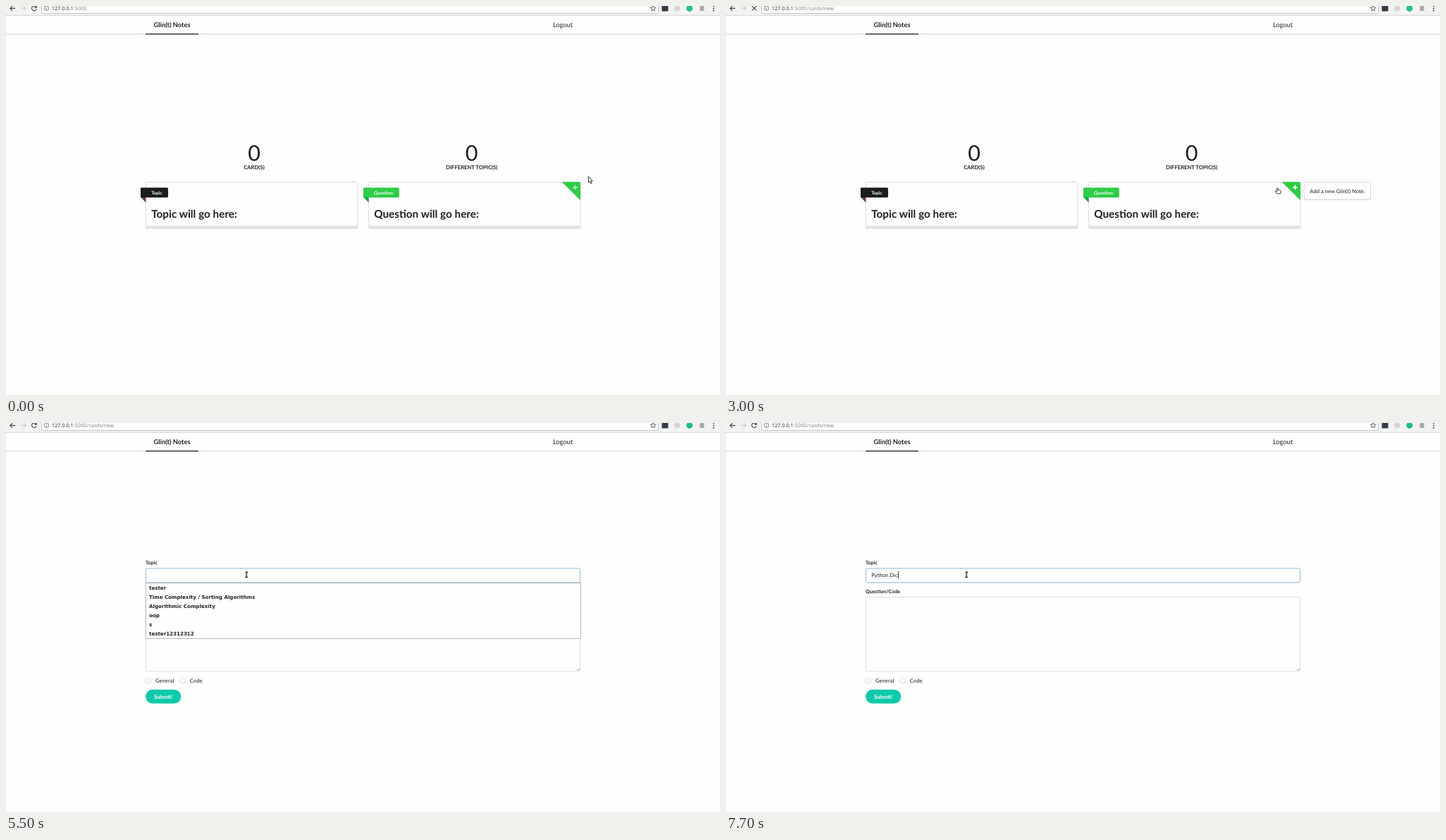
Recreate the animation shown at these times as an HTML page. Size 1013 by 553 pixels, loop 8000 ms.

```html
<!DOCTYPE html>
<html lang="en">
<head>
<meta charset="utf-8">
<title>Study cards</title>
<style>
html, body { margin: 0; width: 100%; height: 100%; overflow: hidden; background: #fefefe; }
svg { position: absolute; left: 0; top: 0; }
text, #topic { font-family: Lato, sans-serif; text-rendering: geometricPrecision; white-space: pre; }
text { fill: #1f2021; }
.b { font-weight: 700; }
.mid { text-anchor: middle; }
.ui { font-family: "Noto Sans", sans-serif; }
.list text { font: 700 7.12px "DejaVu Sans", sans-serif; fill: #222; }
.line { fill: none; stroke: #dcdddd; }
.icon { fill: none; stroke: #444; stroke-width: 1.1; }

.home, .form, .path, .reload, .stop, .tip, .status, .url, .plus, .ring, .all, .match,
.cursor, .arrow, .hand, .beam, #topic, #topic::before { animation: 8s step-end infinite; }

.home { animation-name: home; }
.form { animation-name: form; }
@keyframes home { 0% { opacity: 1 } 40%, 100% { opacity: 0 } }
@keyframes form { 0% { opacity: 0 } 40%, 100% { opacity: 1 } }

.path { animation-name: path; }
.stop { animation-name: stop; }
.reload { animation-name: reload; }
@keyframes path { 0% { opacity: 0 } 31.25%, 100% { opacity: 1 } }
@keyframes stop { 0% { opacity: 0 } 31.25% { opacity: 1 } 40%, 100% { opacity: 0 } }
@keyframes reload { 0% { opacity: 1 } 31.25% { opacity: 0 } 40%, 100% { opacity: 1 } }

.plus { animation-name: plus; }
@keyframes plus { 0% { opacity: .65 } 31.25%, 100% { opacity: 1 } }

.tip { animation-name: tip; transform-origin: 818px 263px; }
@keyframes tip {
  0% { opacity: 0; transform: scale(.9) }
  7.5% { opacity: .6; transform: scale(.96) }
  10%, 100% { opacity: 1; transform: none }
}
.status { animation-name: status; }
.url { animation-name: url; }
@keyframes status { 0% { opacity: 0 } 10% { opacity: 1 } 35%, 100% { opacity: 0 } }
@keyframes url { 0% { opacity: .5 } 12.5%, 100% { opacity: 1 } }

.ring { animation-name: ring; }
@keyframes ring {
  0% { opacity: 0 } 46.25% { opacity: .2 } 48.75% { opacity: .4 }
  50% { opacity: .6 } 51.25% { opacity: .8 } 52.5%, 100% { opacity: 1 }
}
.all { animation-name: all; }
.match { animation-name: match; }
@keyframes all { 0% { opacity: 0 } 46.25% { opacity: 1 } 80%, 100% { opacity: 0 } }
@keyframes match { 0% { opacity: 0 } 80% { opacity: 1 } 81.25%, 100% { opacity: 0 } }

/* typed value with a caret on its right edge */
#topic {
  position: absolute; left: 206.2px; top: 211px; height: 10px;
  font-size: 7.66px; line-height: 10.6px; color: #1f2021;
  border-right: 1px solid #333; animation-name: caret;
}
#topic::before { content: ""; animation-name: typing; }
@keyframes caret {
  0% { border-color: transparent } 46.25% { border-color: #333 }
  52.5% { border-color: transparent } 60% { border-color: #333 }
  68.75% { border-color: transparent } 76.25%, 100% { border-color: #333 }
}
@keyframes typing {
  0% { content: "" } 76.25% { content: "P" } 80% { content: "Py" }
  81.25% { content: "Pyt" } 82.5% { content: "Pytho" } 83.75% { content: "Python" }
  87.5% { content: "Python " } 90% { content: "Python D" }
  93.75% { content: "Python Di" } 96.25%, 100% { content: "Python Dic" }
}

.cursor { animation-name: move; }
@keyframes move {
  0% { transform: translate(826px, 242px) }
  1.25% { transform: translate(825px, 242.5px) }
  2.5% { transform: translate(823.5px, 243px) }
  5% { transform: translate(821.5px, 245.5px) }
  7.5% { transform: translate(808px, 256.5px) }
  35% { transform: translate(804px, 257px) }
  36.25% { transform: translate(796px, 257.5px) }
  37.5% { transform: translate(782.5px, 258px) }
  38.75% { transform: translate(735px, 256px) }
  40% { transform: translate(630px, 246px) }
  41.25% { transform: translate(490px, 230px) }
  42.5% { transform: translate(380px, 218px) }
  43.75% { transform: translate(330.5px, 214.5px) }
  46.25% { transform: translate(337px, 215px) }
  48.75%, 100% { transform: translate(341.2px, 215.6px) }
}
.arrow { animation-name: arrow; }
.hand { animation-name: hand; }
.beam { animation-name: beam; }
@keyframes arrow { 0% { opacity: 1 } 7.5% { opacity: 0 } 40% { opacity: 1 } 42.5%, 100% { opacity: 0 } }
@keyframes hand { 0% { opacity: 0 } 7.5% { opacity: 1 } 40%, 100% { opacity: 0 } }
@keyframes beam { 0% { opacity: 0 } 42.5%, 100% { opacity: 1 } }
</style>
</head>
<body>
<svg width="1013" height="553" viewBox="0 0 1013 553">
  <!-- browser bar -->
  <rect width="1013" height="13" fill="#f3f3f3"/>
  <path d="M0 13.3H1013" stroke="#d3d3d3"/>
  <rect x="50.5" y="-8" width="875" height="18.6" rx="2" fill="#fefefe" stroke="#c4c4c4"/>
  <path class="icon" d="M13 3.4H6M9.2 0L5.8 3.4L9.2 6.8"/>
  <path class="icon" style="stroke:#ccc" d="M21 3.4H28M24.8 0L28.2 3.4L24.8 6.8"/>
  <g class="reload">
    <path class="icon" d="M42.6 1.2A3.4 3.4 0 1 0 43.2 4.2"/>
    <path d="M43.8 -1V2.8H40Z" fill="#444"/>
  </g>
  <path class="icon stop" d="M36.8 0L43.2 6.4M43.2 0L36.8 6.4"/>
  <circle class="icon" cx="57.4" cy="3.2" r="3.3" style="stroke:#666;stroke-width:.8"/>
  <path d="M57.4 1.2V2M57.4 2.8V5.2" stroke="#666" stroke-width=".9"/>
  <g class="ui" font-size="7.35">
    <text class="ui" x="64.7" y="5.8" style="fill:#333">127.0.0.1<tspan fill="#888">:5000</tspan><tspan class="path" fill="#888"></tspan></text>
    <text class="ui path" x="114.8" y="5.8" style="fill:#888">/cards/new</text>
  </g>
  <path class="icon" style="stroke-width:.8" d="M918.2 -.8L919.3 2.1L922.2 2.2L919.9 4L920.7 6.9L918.2 5.2L915.7 6.9L916.5 4L914.2 2.2L917.1 2.1Z"/>
  <rect x="930.5" y="-1" width="9" height="8.6" rx="1" fill="#2f3b47"/>
  <circle cx="952.3" cy="3.4" r="4.2" fill="#d4d4d4"/>
  <circle cx="969.7" cy="3.4" r="4.5" fill="#1fc08c"/>
  <rect x="984.4" y="0" width="6" height="7" fill="#a9a9a9"/>
  <g fill="#444"><circle cx="1004" cy=".3" r="1"/><circle cx="1004" cy="3.5" r="1"/><circle cx="1004" cy="6.7" r="1"/></g>

  <!-- site menu -->
  <path d="M0 40H1013" stroke="#d6d6d6" stroke-width="1.2"/>
  <path d="M198 39.9H273" stroke="#1b1c1d" stroke-width="1.2"/>
  <text class="b mid" x="235.5" y="30" font-size="9.3">Glin(t) Notes</text>
  <text class="mid" x="790" y="30" font-size="9.3">Logout</text>

  <g class="home">
    <g class="mid">
      <text x="352" y="220" font-size="30.6">0</text>
      <text x="660.7" y="220" font-size="30.6">0</text>
      <text class="b" x="352" y="232.2" font-size="7.66">CARD(S)</text>
      <text class="b" x="660.7" y="232.2" font-size="7.66">DIFFERENT TOPIC(S)</text>
    </g>
    <g id="card">
      <rect x="198.4" y="250.4" width="300.4" height="64.2" rx="1.5" fill="#fefefe" stroke="#dcdddd"/>
      <rect x="198" y="312.6" width="301.2" height="3.6" fill="#ebebeb"/>
      <path d="M198 312.7H499.2M198 314.4H499.2" stroke="#dadada" stroke-width=".7"/>
      <path d="M198 316.2H499.2" stroke="#cbcbcb" stroke-width=".8"/>
    </g>
    <use href="#card" x="316"/>
    <path d="M191 271.5H198.4V279.6Z" fill="#75402c"/>
    <path d="M191 258.2H228.4Q230 258.2 230 259.8V270.6Q230 272.2 228.4 272.2H191Z" fill="#1b1c1d"/>
    <text class="b" x="206.2" y="267.5" font-size="6.56" style="fill:#fff">Topic</text>
    <text class="b" x="206.2" y="301.2" font-size="15.3">Topic will go here:</text>
    <path d="M507 271.5H514.6V279.6Z" fill="#1c9a37"/>
    <path d="M507 258.2H556.2Q557.8 258.2 557.8 259.8V270.6Q557.8 272.2 556.2 272.2H507Z" fill="#2ecc47"/>
    <text class="b" x="522" y="267.5" font-size="6.56" style="fill:#fff">Question</text>
    <text class="b" x="522.2" y="301.2" font-size="15.3">Question will go here:</text>
    <path d="M788.6 250H813.4Q815 250 815 251.6V276.2Z" fill="#2ecc47"/>
    <path class="plus" d="M804.2 257.9H810.8M807.5 254.6V261.2" stroke="#fff" stroke-width="1.7"/>
    <g class="tip">
      <rect x="820" y="251.8" width="95" height="24.4" rx="2.5" fill="#000" opacity=".09"/>
      <rect x="820.4" y="250.6" width="94" height="24.4" rx="2" fill="#fefefe" stroke="#d2d3d4" stroke-width=".9"/>
      <path d="M820.9 260.2L818 263L820.9 265.8" fill="#fefefe" stroke="#d2d3d4" stroke-width=".8"/>
      <text x="828.3" y="265.6" font-size="7.66">Add a new Glin(t) Note.</text>
    </g>
  </g>

  <g class="form">
    <text class="b" x="198" y="201.2" font-size="7.11">Topic</text>
    <rect class="line" x="198.4" y="206.5" width="616.2" height="20.4" rx="2"/>
    <rect class="line ring" x="198.4" y="206.5" width="616.2" height="20.4" rx="2" style="stroke:#9cc0da"/>
    <text class="b" x="198" y="242.2" font-size="7.11">Question/Code</text>
    <rect class="line" x="198.4" y="247.5" width="616.2" height="105.4" rx="2"/>
    <path d="M809.8 352.2L813.8 348.2M812 352.2L813.8 350.4" stroke="#888" stroke-width=".7"/>
    <circle class="line" cx="202.1" cy="366.4" r="3.9"/>
    <circle class="line" cx="250.9" cy="366.4" r="3.9"/>
    <text x="212" y="369.2" font-size="7.66">General</text>
    <text x="260.8" y="369.2" font-size="7.66">Code</text>
    <rect x="198" y="379" width="50.4" height="19.8" rx="9.9" fill="#10c9aa"/>
    <text class="b mid" x="223" y="391.6" font-size="7.66" style="fill:#fff">Submit!</text>
  </g>

  <g class="list all">
    <rect x="198.4" y="227.4" width="617" height="79" fill="#fefefe" stroke="#adb0b3" stroke-width=".9"/>
    <text x="203" y="236.7">tester</text>
    <text x="203" y="249.8">Time Complexity / Sorting Algorithms</text>
    <text x="203" y="262.9">Algorithmic Complexity</text>
    <text x="203" y="276">oop</text>
    <text x="203" y="289.1">s</text>
    <text x="203" y="302.2">tester12312312</text>
  </g>
  <g class="list match">
    <rect x="198.4" y="227.4" width="617" height="13.4" fill="#fefefe" stroke="#adb0b3" stroke-width=".9"/>
    <text x="203" y="236.7">potatoes</text>
  </g>

  <g class="status">
    <path d="M-1 541.5H334.5Q336.5 541.5 336.5 543.5V554H-1Z" fill="#f2f2f2" stroke="#dadada" stroke-width=".8"/>
    <text class="ui url" x="1.3" y="550.2" font-size="7.9" style="fill:#555">127.0.0.1:5000/cards/new</text>
  </g>
</svg>

<div id="topic"></div>

<svg width="1013" height="553" viewBox="0 0 1013 553">
  <g class="cursor" stroke-linejoin="round">
    <path class="arrow" d="M.4 .3V9L2.4 7.2L3.8 10.4L5.2 9.8L3.8 6.7H6.2Z" fill="#fff" stroke="#222" stroke-width=".9"/>
    <path class="hand" d="M-.8 5V1Q0 -.2 .8 1V3.4L4 4.2Q5 4.4 4.8 5.6L4.2 8.8H-1.2L-3.6 5.6Q-3.4 4.4 -2.2 4.8L-.8 6Z" fill="#fff" stroke="#222" stroke-width=".9"/>
    <path class="beam" d="M-2 -3.6H2M-2 3.6H2M0 -3.6V3.6" fill="none" stroke="#222" stroke-width="1.4"/>
  </g>
</svg>
</body>
</html>
```
